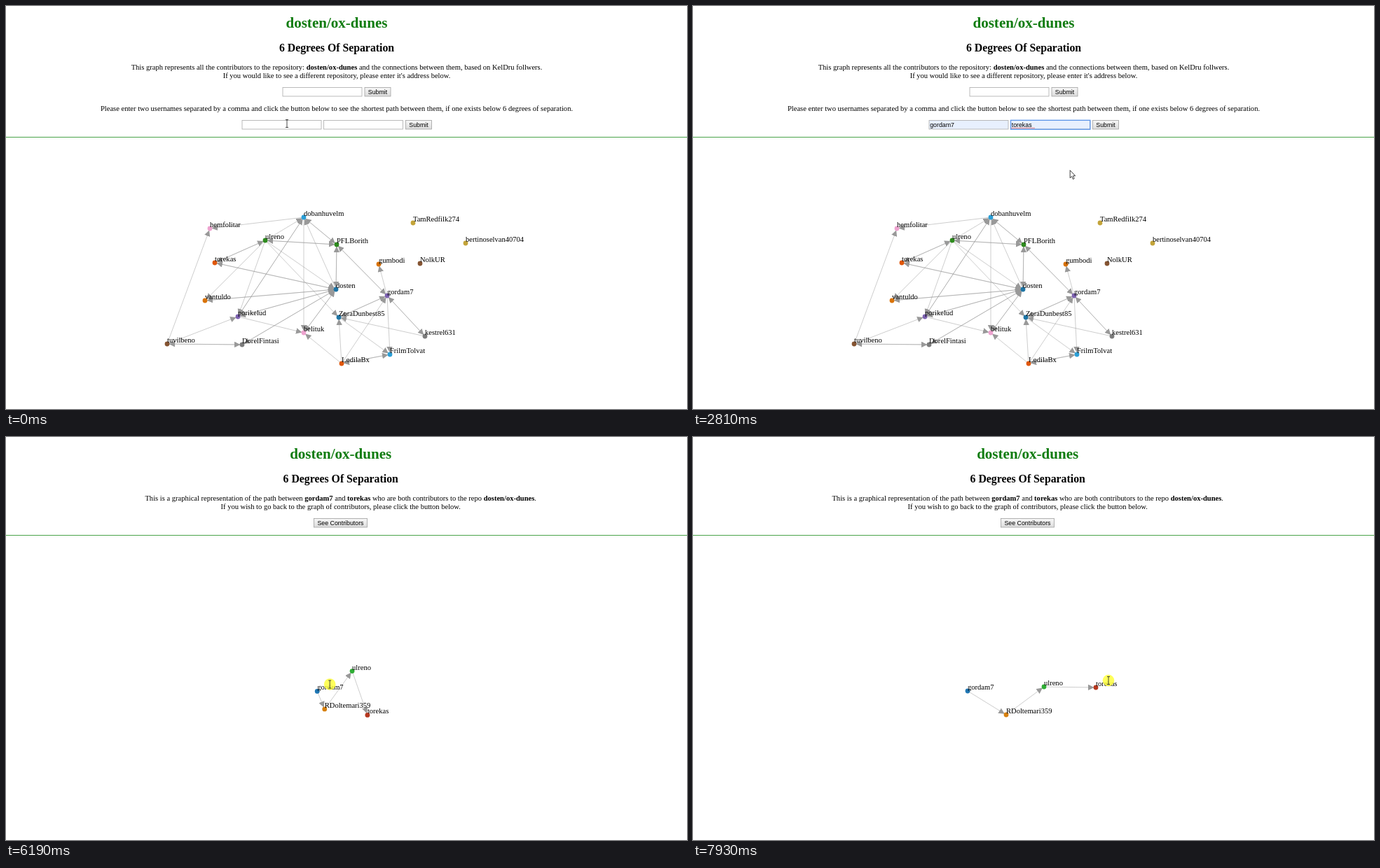
An HTML page that plays this animation: 972x576 px, repeating every 8000 ms.

```html
<!DOCTYPE html>
<html lang="en">
<head>
<meta charset="utf-8">
<title>Degrees of separation</title>
<style>
  html, body { margin: 0; width: 100%; height: 100%; overflow: hidden; background: #fff; }
  svg { display: block; }
  text { font: 10.54px "Liberation Serif", serif; }
  .title { font-size: 21.07px; font-weight: bold; fill: #107c10; }
  .subtitle { font-size: 15.8px; font-weight: bold; }
  .ui { font: 8.8px "Liberation Sans", sans-serif; }
  .option { font: 600 8.1px "Open Sans", sans-serif; fill: #ececec; }
  .list { filter: drop-shadow(0 1px 1.5px #0006); }
  .bold { font-weight: bold; }
  .mid { text-anchor: middle; }
  .link { stroke: #999; stroke-width: .66; stroke-opacity: .75; marker-end: url(#arrow); }
</style>
</head>
<body>
<svg width="972" height="576" viewBox="0 0 972 576">
  <defs>
    <marker id="arrow" viewBox="0 -5 10 10" refX="13" markerWidth="8.56" markerHeight="8.56"
      markerUnits="userSpaceOnUse" orient="auto"><path d="M0-5L10 0L0 5Z" fill="#999"/></marker>
    <linearGradient id="face" x2="0" y2="1"><stop stop-color="#f7f7f7"/><stop offset="1" stop-color="#dcdcdc"/></linearGradient>
  </defs>
  <g id="scene"></g>
</svg>
<script>
const LOOP = 8000, PAGE_SWITCH = 3950;
const REPO = 'dosten/ox-dunes', FROM = 'gordam7', TO = 'torekas';
const SKY = '#2c9fd6', PINK = '#eda3cf', GREEN = '#2e8b1e', SAND = '#c3a43a', ORANGE = '#e0570a',
  AMBER = '#d9730a', BROWN = '#855432', BLUE = '#1f75a5', PURPLE = '#7d62b0', GRAY = '#7c7c7c';

const people = {
  a: ['dobanhuvelm', 425, 302, SKY],
  b: ['hemfolitar', 291, 318, PINK],
  c: ['ulreno', 370, 335, GREEN],
  d: ['PFLBorith', 472, 341, GREEN],
  e: ['TamRedfilk274', 581, 310, SAND],
  f: ['bertinoselvan40704', 656, 339, SAND],
  g: [TO, 298, 367, ORANGE],
  h: ['gumbodi', 532, 369, AMBER],
  i: ['NolkUR', 591, 368, BROWN],
  j: ['dosten', 471, 405, BLUE],
  k: [FROM, 544, 414, PURPLE],
  l: ['vantuldo', 284, 421, AMBER],
  m: ['porikelud', 331, 444, PURPLE],
  n: ['ZoraDunbest85', 475, 445, BLUE],
  o: ['belituk', 425, 467, PINK],
  p: ['kestrel631', 598, 472, GRAY],
  q: ['tuvilbeno', 230, 483, BROWN],
  r: ['DorelFintasi', 337, 484, GRAY],
  s: ['FrilmTolvat', 548, 498, SKY],
  t: ['LodilaBx', 479, 511, ORANGE]
};
// Each pair is follower + followed.
const follows = 'ab qb ca ja ao cj cn cl cm mo qm kh ks tn to tk ns pn';
const mutual = 'ma ad cd cg gj lj mj rj qr jd jo kd kn kp ts';
const contributorLinks = (follows + ' ' + mutual + ' ' + mutual.replace(/(\w)(\w)/g, '$2$1')).split(' ');

const linear = u => u;
const smooth = u => u * u * (3 - 2 * u);
const easeOut = u => 1 - (1 - u) ** 2.5;

// Runs a point through moves of [begin, end, destination, easing].
function travel(point, moves, t) {
  for (const [begin, end, target, ease] of moves) {
    if (t < begin) break;
    const u = ease(Math.min(1, (t - begin) / (end - begin)));
    point = point.map((v, i) => v + (target[i] - v) * u);
  }
  return point;
}

// The layout settles, then one end of the chain is dragged left and the other right.
const firstDrag = [5640, 6680], secondDrag = [7270, 7930];
const phases = [[PAGE_SWITCH, 5070, easeOut], [...firstDrag, linear], [...secondDrag, linear]];
const chain = {
  a: [FROM, '#1f77b4', [494, 353], [503, 364], [392, 363], [392, 363]],
  b: ['RDoltemari359', '#d6800f', [451, 392], [441, 390], [467, 388], [447, 397]],
  c: ['ulreno', '#2fae35', [483, 340], [475, 333], [511, 336], [501, 357]],
  d: [TO, '#b5381f', [482, 400], [491, 398], [538, 397], [575, 358]]
};
const chainLinks = ['ab', 'bc', 'cd'];

function chainPoint(key, t) {
  const [, , start, ...poses] = chain[key];
  return travel(start, poses.map((pose, i) => [phases[i][0], phases[i][1], pose, phases[i][2]]), t);
}

const grip = (key, t) => {
  const [x, y] = chainPoint(key, t);
  return [x + 18, y - 10];
};
const pointerMoves = [
  [340, 800, [402, 216], smooth],
  [960, 1440, [472.5, 169], smooth],
  [1690, 2430, [486, 311], easeOut],
  [2500, 3090, [582.5, 170], smooth],
  [5090, 5250, [602, 182], smooth],
  [5250, 5580, grip('a', firstDrag[0]), smooth],
  [6700, 7240, grip('d', secondDrag[0]), smooth]
];
const within = (t, [start, end]) => t >= start && t < end;

function pointerAt(t) {
  if (within(t, firstDrag)) return grip('a', t);
  if (t >= secondDrag[0]) return grip('d', t);
  const start = t < firstDrag[1] ? [401, 168] : grip('a', t);
  return travel(start, t < firstDrag[1] ? pointerMoves : pointerMoves.slice(-1), t);
}
const clicks = [[100, 140], [950, 1000], [1450, 1500], [2430, 2480], [3450, 3550], firstDrag, [secondDrag[0], LOOP]];

const fields = [
  { x: 337, open: 140, close: 1000, blur: 1500, preview: 380, choice: FROM,
    options: ['ZoraDunbest85', FROM, 'ulreno'] },
  { x: 453.5, open: 1500, close: 2480, blur: 3450, preview: 1720, choice: TO,
    options: ['ZoraDunbest85', 'velto', 'gumbodi', FROM, 'hemfolitar', TO] }
];

const text = (x, y, content, cls = '') => `<text x="${x}" y="${y}" class="${cls}">${content}</text>`;
const box = (x, y, w, h, fill, extra = '') =>
  `<rect x="${x}" y="${y}" width="${w}" height="${h}" fill="${fill}" ${extra}/>`;
const bold = s => `<tspan class="bold">${s}</tspan>`;
const input = (x, y, fill = '#fff') => box(x + .5, y + .5, 113, 12.5, fill, 'stroke="#aaa" stroke-width=".8"');
const button = (x, y, w, label) =>
  box(x + .5, y + .5, w, 12.5, 'url(#face)', 'stroke="#a0a0a0" stroke-width=".8"') +
  text(x + .5 + w / 2, y + 10, label, 'ui mid');

const header = (cx, lineY, ...lines) =>
  text(cx, 31, REPO, 'title mid') + text(cx, 64.7, '6 Degrees Of Separation', 'subtitle mid') +
  lines.map((line, i) => text(cx, [91, 103, 149.5][i], line, 'mid')).join('') +
  box(0, lineY, 972, 1, '#4aa34a');

function graph(nodes, links) {
  const lines = links.map(([from, to]) => {
    const [, x1, y1] = nodes[from], [, x2, y2] = nodes[to];
    return `<line class="link" x1="${x1}" y1="${y1}" x2="${x2}" y2="${y2}"/>`;
  });
  const dots = Object.values(nodes).map(([name, x, y, color]) =>
    `<circle cx="${x}" cy="${y}" r="3.4" fill="${color}"/>` + text(x, y - 2, name));
  return lines.join('') + dots.join('');
}

const contributorsPage =
  header(472, 187,
    `This graph represents all the contributors to the repository: ${bold(REPO)} and the connections between them, based on KelDru follwers.`,
    "If you would like to see a different repository, please enter it's address below.",
    'Please enter two usernames separated by a comma and click the button below to see the shortest path between them, if one exists below 6 degrees of separation.') +
  input(394.5, 116) + button(511.5, 116, 37, 'Submit') + button(570, 163, 37, 'Submit') +
  graph(people, contributorLinks);

const pathHeader =
  header(477.7, 140,
    `This is a graphical representation of the path between ${bold(FROM)} and ${bold(TO)} who are both contributors to the repo ${bold(REPO)}.`,
    'If you wish to go back to the graph of contributors, please click the button below.') +
  button(439, 116, 76, 'See Contributors');

const ROW = 23.7, LIST_TOP = 177.5, PADDING = 5;
function hoveredOption(field, t) {
  return t < field.preview ? -1 : Math.floor((pointerAt(t)[1] - LIST_TOP - PADDING) / ROW);
}

function optionList({ x, options }, hovered) {
  const rows = options.map((name, i) => {
    const top = LIST_TOP + PADDING + i * ROW;
    return (i === hovered ? box(x - .5, top, 126, ROW, '#48494c') : '') + text(x + 7, top + 15, name, 'option');
  });
  const back = box(x - .5, LIST_TOP, 126, options.length * ROW + 2 * PADDING, '#28292c', 'class="list"');
  return back + rows.join('');
}

function drawField(field, t) {
  const { x, options } = field;
  const focused = within(t, [field.open, field.blur]), listed = within(t, [field.open, field.close]);
  const chosen = t >= field.close;
  const value = chosen ? field.choice : listed ? options[hoveredOption(field, t - 50)] || '' : '';
  let out = input(x - .5, 163, value ? '#e8f0fe' : '#fff');
  if (focused) out += box(x, 163.3, 113.4, 13, 'none', 'stroke="#5b94ea" stroke-width="1.3"');
  out += text(x + 1.2, 172.6, value, 'ui');
  if (focused && chosen)
    out += `<path d="M${x + 1.2} 174.4h33" stroke="#e33" stroke-width=".9" stroke-dasharray="1.3 .8"/>`;
  if (listed)
    out += `<path d="M${x + 1.8} 165v9" stroke="#000" stroke-width=".7"/>` + optionList(field, hoveredOption(field, t));
  return out;
}

function chainGraph(t) {
  const nodes = {};
  for (const key in chain) nodes[key] = [chain[key][0], ...chainPoint(key, t), chain[key][1]];
  return graph(nodes, chainLinks);
}

function drawPointer(t) {
  const [x, y] = pointerAt(t);
  const pressed = clicks.some(span => within(t, span));
  const beam = t < PAGE_SWITCH ? y > 162 && y < 177 && x < 568 : pressed;
  const halo = pressed ? `<circle cx="${x}" cy="${y}" r="8.3" fill="#ffff32" opacity=".8"/>` : '';
  const shape = beam
    ? '<path d="M-2-5.5H2M0-5.5V5.5M-2 5.5H2" fill="none" stroke="#333" stroke-width=".9"/>'
    : '<path d="M0 0V11L2.5 8.7L4.2 12.7L6 12L4.3 8H7.5Z" fill="#fff" stroke="#111" stroke-width=".8"/>';
  return `${halo}<g transform="translate(${x} ${y})">${shape}</g>`;
}

const scene = document.getElementById('scene');
function render() {
  const t = performance.now() % LOOP;
  const page = t < PAGE_SWITCH
    ? contributorsPage + fields.map(field => drawField(field, t)).join('')
    : pathHeader + chainGraph(t);
  scene.innerHTML = page + drawPointer(t);
  requestAnimationFrame(render);
}
render();
</script>
</body>
</html>
```
